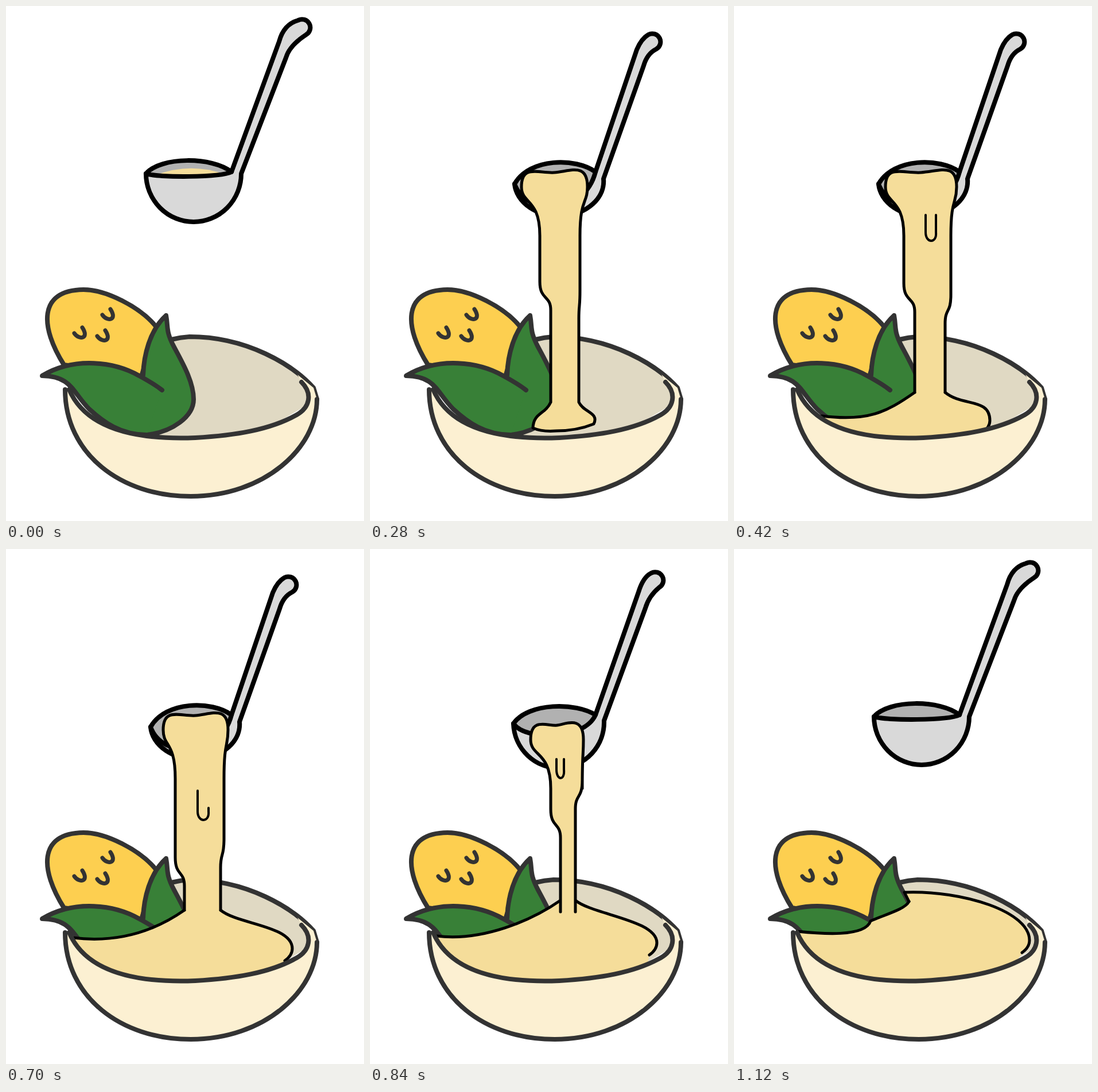
These frames come from a looping animation (624x897 px, 2.24 s). An HTML page:

```html
<!DOCTYPE html>
<html lang="en">
<head>
<meta charset="utf-8">
<title>Corn soup</title>
<style>
  html, body { margin: 0; width: 100%; height: 100%; overflow: hidden; background: #fff; }
  svg { display: block; width: 100%; height: 100%; }
  path { stroke-linecap: round; stroke-linejoin: round; }
  .step {
    visibility: hidden;
    animation: show 2240ms step-end infinite;
    animation-delay: calc(var(--i) * 140ms - 2240ms);
  }
  .rest { animation-name: rest; }
  @keyframes show { 0% { visibility: visible; } 6.25%, 100% { visibility: hidden; } }
  @keyframes rest { 0% { visibility: visible; } 50%, 100% { visibility: hidden; } }
</style>
</head>
<body>
<svg id="stage" viewBox="0 0 624 897"></svg>
<script>
const INK = '#333', BLACK = '#000', STEEL = '#d9d9d9', SHADE = '#b1b1b1';
const SOUP = '#f5dd9a', LEAF = '#388037', CORN = '#fdcf50', BOWL = '#fcf0d2', INSIDE = '#e0d9c3';
const stage = document.getElementById('stage');

const add = (parent, tag, attrs) => {
  const el = document.createElementNS('http://www.w3.org/2000/svg', tag);
  for (const k in attrs) el.setAttribute(k, attrs[k]);
  return parent.appendChild(el);
};
const draw = (g, d, fill = 'none', stroke = 'none', width = 8) =>
  add(g, 'path', { d, fill, stroke, 'stroke-width': width });

// Ladle: the cup hangs below the rim, the handle runs from the rim to the knob.
function ladle(g, { left: [x, y], top, lip, depth, end, neck: [nx, ny], knob: [kx, ky] }, full) {
  const rx = 393, ry = 289, [ex, ey] = end;
  const front = (ax, ay, bx, by) => `${ax},${ay}C${rx - 20},${lip} ${x + 20},${lip} ${bx},${by}Z`;
  draw(g, `M${x},${y}A${(ex - x) / 2},${depth} 0 0 0 ${ex},${ey}L${nx + 12},${ny + 28}
    Q${nx + 18},${ny + 7} ${kx + 8},${ky + 12}A14,14 0 0 0 ${kx - 6},${ky - 13}
    Q${nx + 8},${ky - 6} ${nx},${ny}L${rx},${ry}Z`, STEEL, BLACK);
  const rim = `M${x},${y}C${x + 26},${top} ${rx - 34},${top} ` + front(rx, ry, x, y);
  draw(g, rim, SHADE);
  if (full) draw(g, `M${x + 18},${y + 2}Q322,${y - 20} ` + front(rx - 12, ry + 4, x + 18, y + 2), SOUP);
  draw(g, rim, 'none', BLACK);
}
const upright = { left: [244, 292], top: 262, lip: 299, depth: 84, end: [410, 292], neck: [476, 62], knob: [515, 38] };
const leaning = { left: [250, 304], top: 267, lip: 334, depth: 80, end: [408, 299], neck: [468, 75], knob: [496, 55] };
const pouring = { left: [252, 310], top: 264, lip: 366, depth: 60, end: [407, 301], neck: [465, 76], knob: [491, 63] };

// Stream: each side is [lip, body, notch height, foot], mirrored up and down.
function stream(g, [l, lb, ln, lf], [r, rb, rn, rf], top, base, end = '') {
  draw(g, `M${lf},${base}L${lf},${ln + 25}C${lf},${ln - 2} ${lb},${ln + 8} ${lb},${ln - 25}
    L${lb},${top + 110}C${lb},${top + 45} ${l},${top + 55} ${l},${top + 25}
    C${l},${top - 15} ${l + 30},${top + 2} ${(l + r) / 2},${top}S${r},${top - 18} ${r},${top + 25}
    C${r},${top + 55} ${rb},${top + 45} ${rb},${top + 110}L${rb},${rn - 25}
    C${rb},${rn + 8} ${rf},${rn - 2} ${rf},${rn + 25}L${rf},${base}` + end, SOUP, BLACK, 5);
}

// Soup surface: outer edges in black, the rest is hidden behind the bowl's front.
function surface(g, leftEdge, rightEdge) {
  draw(g, `M${leftEdge}L${rightEdge}L480,740 330,800 150,760Z`, SOUP);
  draw(g, `M${leftEdge}`, 'none', BLACK, 5);
  draw(g, `M${rightEdge}`, 'none', BLACK, 5);
}
const turn = 'q0,12 -13,21';

function pour(g, pose, { left, right, top = 290, base, sink = 0, pool: [lx, ly, rx, ry], drip: [x, y, h, w, hook] }) {
  ladle(g, pose);
  const a = left[3], b = right[3];
  surface(g,
    `${lx},${ly}C${lx + 80},${ly + 10} ${a - 50},${base + 35} ${a},${base}`,
    `${b},${base}C${b + 30},${base + 25} ${rx},${ry - 40} ${rx},${ry}${turn}`);
  stream(g, left, right, top, base + sink);
  draw(g, `M${x},${y}v${h}c0,20 ${w + 2},20 ${w},0v${-hook}`, 'none', BLACK, 4);
}

function calm(g, sag, right) {
  ladle(g, upright);
  surface(g,
    `110,${666 + sag / 2}C150,${670 + sag} 228,${677 + sag} 238,${648 + sag}C262,${637 + sag} 298,628 305,614`,
    `305,614L297,${598 + sag}C400,${594 + sag} ${right + 1},${632 + sag} ${right},${682 + sag / 2}${turn}`);
}

const step = (i, cls = '') => add(stage, 'g', { class: 'step ' + cls, style: `--i:${i}` });

// Bowl, back half
const outer = 'M103,668C103,780 200,854 322,854C450,854 542,770 542,685';
const back = 'L536,665C500,625 420,576 320,576Q304,577 288,581';
const inner = '515,655C535,675 530,700 505,713C460,738 400,748 330,752C230,756 140,738 110,668';
draw(stage, `M542,685${back}L110,668 200,760 440,745Z`, INSIDE);
draw(stage, `M542,685${back}`, 'none', INK);

// Corn
draw(stage, 'M101,625C60,560 55,495 135,494C175,494 235,525 262,559L236,645Z', CORN, INK);
for (const at of ['119,570', '168,538', '159,575'])
  draw(stage, `M${at}c8,12 27,10 14,-10`, 'none', INK, 7);
draw(stage, 'M279,539C250,565 240,610 239,643L190,720 245,747C290,742 327,715 327,685C327,655 308,622 293,594S283,560 279,539Z', LEAF, INK);
draw(stage, 'M245,747C200,747 170,725 145,702C115,672 115,645 63,644C120,610 190,620 232,644Q258,658 272,669', LEAF, INK);

// One pour
ladle(step(0), upright, true);
ladle(step(1), leaning, true);
const first = step(2);
ladle(first, pouring);
stream(first, [264, 296, 505, 315], [379, 366, 520, 364], 290, 690,
  'C372,708 400,708 390,728Q360,740 325,740Q300,742 284,735C285,708 305,712 315,690');
pour(step(3), pouring, {
  left: [264, 296, 508, 315], right: [388, 378, 528, 368], base: 673,
  pool: [153, 714, 446, 722], drip: [334, 364, 30, 18, 30]
});
pour(step(4), pouring, {
  left: [269, 295, 535, 312], right: [388, 379, 530, 371], base: 652,
  pool: [118, 686, 481, 703], drip: [334, 393, 33, 18, 18]
});
pour(step(5), pouring, {
  left: [274, 295, 562, 311], right: [387, 380, 530, 374], base: 629,
  pool: [116, 677, 499, 696], drip: [334, 421, 36, 19, 6]
});
pour(step(6), leaning, {
  left: [280, 315, 478, 332], right: [372, 370, 428, 358], top: 307, base: 612, sink: 20,
  pool: [116, 674, 500, 686], drip: [325, 366, 18, 13, 18]
});
calm(step(7), 8, 508);
calm(step(8, 'rest'), 0, 515);

// Bowl, front half
draw(stage, `${outer}L536,665 508,642 ${inner}Z`, BOWL);
draw(stage, outer, 'none', INK);
draw(stage, `M${inner}`, 'none', INK);
</script>
</body>
</html>
```
